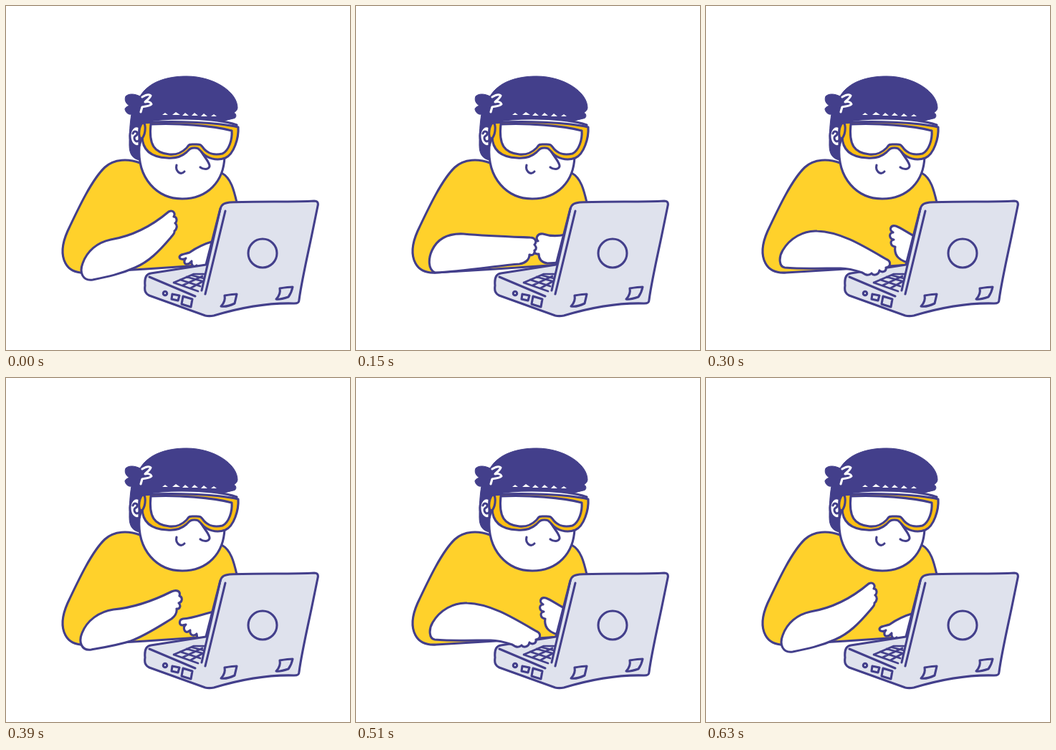
Animation of 480 by 480 pixels, one loop 660 ms. Source, as an HTML page:

```html
<!DOCTYPE html>
<html lang="en">
<head>
<meta charset="utf-8">
<title>Typing in goggles</title>
<style>
  html, body { margin: 0; width: 100%; height: 100%; overflow: hidden; background: #fff; }
  svg { display: block; width: 100vw; height: 100vh; }
  .ink { stroke: #433f8b; stroke-width: 3.1; stroke-linecap: round; stroke-linejoin: round; fill: none; }
  .white { fill: #fff; }
  .yellow { fill: #ffd12b; }
  .amber { fill: #fdbf12; }
  .grey { fill: #dfe2ed; }
  .navy { fill: #433f8b; }

  /* 22 ticks of 30 ms: up, lift, level, down, down, level, lift, ... */
  .up, .lift, .level, .down { opacity: 0; animation: 660ms step-end infinite; }
  .up { animation-name: up; }
  .lift { animation-name: lift; }
  .level { animation-name: level; }
  .down { animation-name: down; }
  @keyframes up {
    0%, 31.818%, 63.636%, 95.454%, 100% { opacity: 1; }
    4.545%, 36.363%, 68.181% { opacity: 0; }
  }
  @keyframes lift {
    4.545%, 27.272%, 36.363%, 59.09%, 68.181%, 90.909% { opacity: 1; }
    0%, 9.09%, 31.818%, 40.909%, 63.636%, 72.727%, 95.454%, 100% { opacity: 0; }
  }
  @keyframes level {
    9.09%, 22.727%, 40.909%, 54.545%, 72.727%, 86.363% { opacity: 1; }
    0%, 13.636%, 27.272%, 45.454%, 59.09%, 77.272%, 90.909%, 100% { opacity: 0; }
  }
  @keyframes down {
    13.636%, 45.454%, 77.272% { opacity: 1; }
    0%, 22.727%, 54.545%, 86.363%, 100% { opacity: 0; }
  }
</style>
</head>
<body>
<svg viewBox="0 0 480 480">
  <g class="ink">
    <!-- body -->
    <path class="yellow" d="M187 219C171 213 151 213 138 225C120 242 102 280 86 314C78 332 77 348 83 359C89 370 99 373 112 372L195 367L284 361L322 274C318 257 314 240 301 233Z"/>

    <!-- hair and face -->
    <path class="navy" stroke-width="1" d="M186 215C176 213 172 206 172 194C172 178 173 162 175 151C171 152 167 149 166 144C166 142 169 140 172 139C167 136 165 131 167 126C171 122 179 122 187 126C199 106 224 98 252 98C290 98 323 120 323 142C323 146 319 148 318 149C322 150 322 157 317 157L305 160L240 170L190 190Z"/>
    <path class="white" d="M186 196C183 241 211 269 246 269C281 269 304 245 305 210L322 166C290 155 225 155 195 161Z"/>
    <path class="white" d="M186 169C179 165 173 172 173 181C173 191 179 198 186 195Z"/>
    <path d="M177 178C179 173 184 175 183 179C182 182 179 181 179 184C179 188 182 190 185 188"/>
    <path d="M190 127C195 124 200 123 202 125C201 128 197 131 194 134C198 133 202 134 203 137C200 140 194 140 190 141L188 148" style="stroke:#fff"/>
    <path class="white" style="stroke:none" d="M218 152l4-3 4 3zM232 152l5-4 6 4zM246 153l4-4 5 4zM259 153l4-4 5 4zM272 154l4-4 5 4zM286 154l4-3 4 3z"/>

    <!-- goggles -->
    <path class="amber" d="M192 163C230 160 294 162 324 169C325 184 318 207 306 212C293 217 280 212 273 204C268 198 267 198 263 198C257 198 256 200 252 204C244 211 235 213 225 212C203 211 190 202 190 181Z"/>
    <path class="white" d="M202 165C239 163 289 167 315 174C316 186 311 202 302 206C290 209 281 205 276 199C271 192 270 193 263 193C257 193 256 192 252 198C246 204 238 208 228 207C207 205 199 194 202 165Z"/>
    <ellipse class="amber" cx="190" cy="174" rx="4" ry="11" transform="rotate(8 190 174)"/>
    <path class="white" d="M273 204C277 211 285 219 284 224C282 229 275 228 271 225"/>
    <path d="M238 222C236 230 243 237 249 231"/>

    <!-- far hand -->
    <g class="white">
      <path class="up" d="M290 328C276 332 263 339 256 344C250 346 243 346 242 350C242 354 248 354 251 352C247 356 249 361 253 360C256 360 258 357 259 356C258 362 262 365 266 362C267 367 271 370 276 367L285 364"/>
      <path class="lift" d="M290 326C275 329 262 335 247 336C241 337 241 345 246 345L251 344C246 348 249 356 254 354L257 352C256 359 262 361 266 357C266 364 271 367 276 365L285 362"/>
      <path class="level" d="M292 319C278 322 267 320 261 318C253 317 250 324 254 328C246 327 245 335 251 337C246 339 247 347 255 346C255 354 260 358 267 359L284 358"/>
      <path class="down" d="M294 323C281 316 271 309 265 307C257 305 255 313 261 316C255 316 255 325 262 326C256 327 257 335 264 336C262 348 270 357 288 359"/>
    </g>

    <!-- laptop -->
    <path class="grey" d="M299 283C301 276 305 275 312 274C350 272 400 274 430 272C435 272 436 275 435 279L426 323C419 356 412 387 409 410C409 414 407 415 402 415C370 414 330 420 290 432C285 433 282 433 278 432L200 404C194 401 193 397 194 390C193 380 195 374 202 373L279 361Z"/>
    <path d="M299 283L273 397M306 286L278 402M200 378L264 405"/>
    <path d="M234 386L262 374H277M234 386L268 398M243 382L271 391M252 378L274 384M246 390L274 377M257 394L275 384M260 376L276 380" stroke-width="2.7"/>
    <circle cx="222" cy="401" r="2.7"/>
    <path d="M232 402L242 404L240 411L231 409ZM247 405L260 409L258 420L245 416Z"/>
    <path d="M305 404C311 403 317 402 322 402C321 407 320 411 319 415C313 418 306 420 300 419C304 415 306 409 305 404ZM382 394C388 393 394 392 400 392C399 397 397 402 394 406C388 408 382 410 377 409C381 405 383 399 382 394Z"/>
    <circle cx="358" cy="345" r="20"/>

    <!-- near arm -->
    <g class="white">
      <path class="up" d="M121 382C107 384 102 372 107 359C113 342 127 330 146 326C176 321 201 309 227 287C233 284 237 289 234 294C239 294 239 301 236 303C240 306 238 312 235 314C236 317 233 319 230 323C213 343 199 357 180 365C160 374 141 378 121 382Z"/>
      <path class="lift" d="M119 379C105 381 101 368 106 356C113 338 130 326 150 323C183 320 209 309 231 298C238 295 244 297 242 304C247 306 246 313 241 314C245 318 242 323 238 322C239 328 236 332 231 336C213 347 195 359 174 367C155 373 136 376 119 379Z"/>
      <path class="level" d="M110 372C100 367 101 352 106 341C114 324 130 317 150 318C184 321 217 322 243 323C250 323 253 329 249 333C252 336 252 340 249 341C250 346 246 349 242 347C242 354 236 359 228 360C200 362 150 370 110 372Z"/>
      <path class="down" d="M110 365C102 364 101 351 107 341C117 324 136 313 155 314C188 315 220 335 251 353C259 356 258 364 251 365C252 370 246 373 242 369C241 375 234 377 231 373C227 377 222 375 218 372C206 368 198 366 188 366C163 366 130 367 110 365Z"/>
    </g>
  </g>
</svg>
</body>
</html>
```
